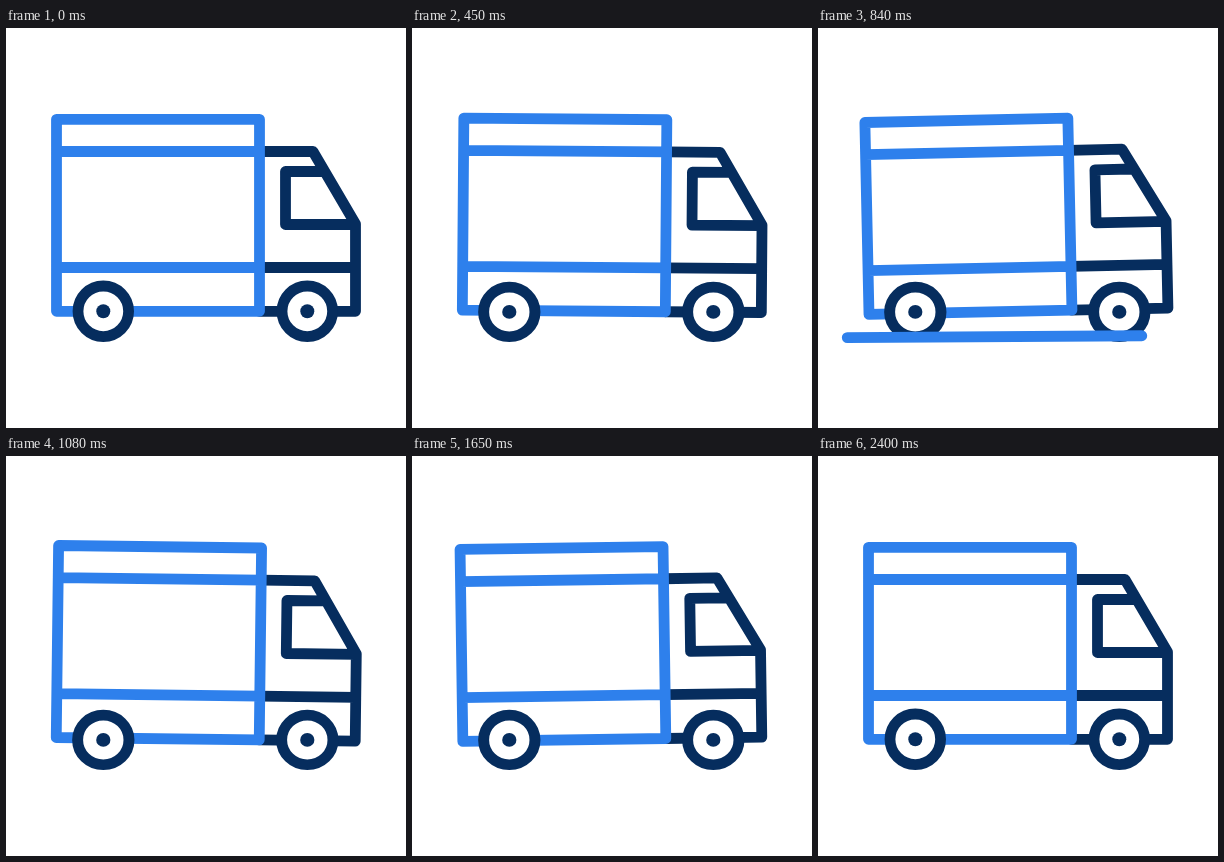
Write an HTML page that moves like this. It is 400x400 px and loops after 2.46 s.

```html
<!DOCTYPE html>
<html lang="en">
<head>
<meta charset="utf-8">
<title>Delivery truck</title>
<style>
  html, body { margin: 0; width: 100%; height: 100%; overflow: hidden; background: #fff; }
  svg { display: block; width: 100%; height: 100%; }
  .ink { fill: none; stroke-width: 10.8; stroke-linecap: round; stroke-linejoin: round; }
  .navy { stroke: #062d5e; }
  .blue { stroke: #2e80ec; }
  .hub { fill: #062d5e; }
</style>
</head>
<body>
<svg viewBox="0 0 400 400">
  <g id="truck" class="ink">
    <path class="navy" d="M253.5 123.5H307L349.5 196V283.3H253.5M253.5 239.5H349.5M317 143.5H279.5V196.5H349.5"/>
    <path class="blue" d="M50.5 91.3H253.5V283.3H50.5ZM50.5 123.5H253.5M50.5 239.5H253.5"/>
  </g>
  <g class="wheel">
    <circle class="ink navy" style="fill:#fff" cx="97.3" cy="283.3" r="25.3"/>
    <circle class="hub" cx="97.3" cy="283.3" r="7"/>
  </g>
  <g class="wheel">
    <circle class="ink navy" style="fill:#fff" cx="301.3" cy="283.3" r="25.3"/>
    <circle class="hub" cx="301.3" cy="283.3" r="7"/>
  </g>
  <line id="road" class="ink blue"/>
</svg>
<script>
const LOOP = 2460, STEP = 30, REST = 2400;
const truck = document.getElementById('truck');
const road = document.getElementById('road');
const wheels = [...document.querySelectorAll('.wheel')];
const clamp = v => Math.max(0, Math.min(1, v));

// Body tilt in degrees: a steady sway, then one soft swing back to rest.
function tilt(t) {
  if (t < 1500) return 1.45 * Math.sin(t / 500 * Math.PI);
  const u = clamp((t - 1500) / 900);
  return -9.4 * u * (1 - u) ** 3.5;
}

// The road streak sweeps from right to left three times.
function drawRoad(t) {
  const p = (t % 600) / 420;
  const shown = t > 0 && t < 1800 && p > 0 && p < 1;
  road.style.display = shown ? '' : 'none';
  if (!shown) return;
  const head = 1 - (1 - p) ** 3.3;
  const tail = clamp((p - 0.3) / 0.7) ** 1.8;
  const set = (n, k) => {
    road.setAttribute('x' + n, 394.5 - 389 * k);
    road.setAttribute('y' + n, 307.3 + 2.4 * k);
  };
  set(1, head);
  set(2, tail);
}

function draw(t) {
  truck.setAttribute('transform', `rotate(${tilt(t)} 199 262)`);
  const load = clamp(t / 120) * clamp((REST - t) / 400);
  const sx = 1 + 0.015 * load, sy = 1 - 0.02 * load;
  wheels.forEach((w, i) => {
    const x = 97.3 + 204 * i;
    w.setAttribute('transform', `translate(${x} 314) scale(${sx} ${sy}) translate(${-x} -314)`);
  });
  drawRoad(t);
}

const start = performance.now();
function tick() {
  const t = (performance.now() - start) % LOOP;
  draw(Math.min(REST, Math.floor(t / STEP) * STEP));
  requestAnimationFrame(tick);
}
draw(0);
requestAnimationFrame(tick);
</script>
</body>
</html>
```
